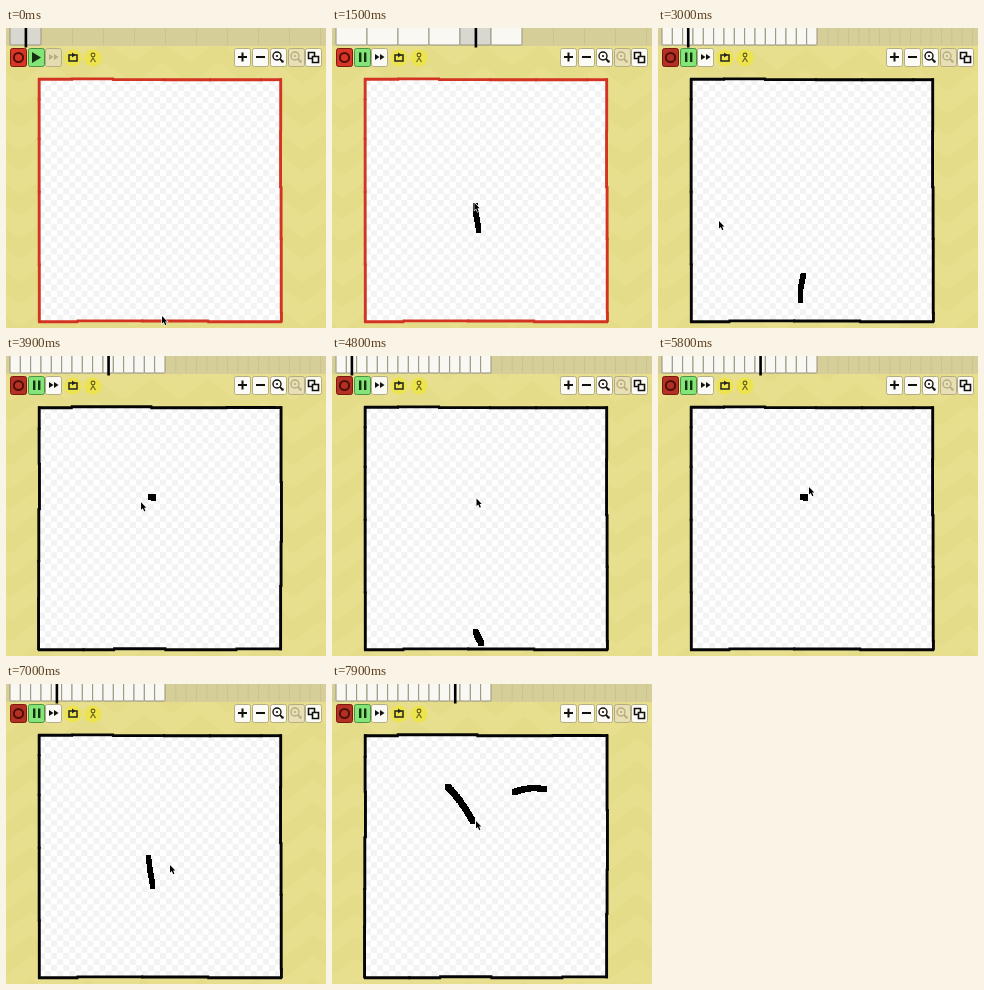
An HTML page with a canvas that plays this animation: 320x300 px, repeating every 8000 ms.

```html
<!DOCTYPE html>
<html lang="en">
<head>
<meta charset="utf-8">
<title>Sketch recorder</title>
<style>
html, body { margin: 0; width: 320px; height: 300px; overflow: hidden; background: #e6de8c; }
canvas { display: block; }
</style>
</head>
<body>
<canvas id="stage" width="320" height="300"></canvas>
<script>
const ctx = document.getElementById('stage').getContext('2d');
const LOOP = 8000, FRAMES = 15, FPS = 8.1, PLAY_AT = 898;
const PAPER = { x: 33, y: 51, size: 242 };
const INK = '#111', DIM = '#b6ad83', SUN = '#ede34c';

// Time is counted in animation steps since play was pressed.
const stepAt = t => Math.max(0, (t - PLAY_AT) * FPS / 1000);

// Pen strokes: a rocket rising, then two sparks thrown from its top.
const rocket = p => [
  145 + 4 * Math.cos(2.4 * (p - 1)) * Math.exp(-p / 12),
  141 + 156 / (1 + Math.exp(1.05 * (p - 3.65)))
];
const spark = (from, vx, vy, g) => p => {
  const u = p - from;
  return [142.5 + vx * u, 141.5 - vy * u + g * u * u];
};
const flights = [
  { from: 1, to: 10, at: rocket },
  { from: 26, to: 29, at: spark(26, -30, 56, 15) },
  { from: 40, to: 43, at: spark(40, 36.5, 46.5, 14.5) }
];

// Pointer rests between strokes: step, x, y
const rests = [
  [0, 156, 288], [15, 12, 32], [17, 61, 193],
  [31.6, 144.5, 142.5], [39.7, 151, 131], [49.4, 164, 181], [56.6, 144, 137]
];
const stops = [
  ...rests,
  ...flights.flatMap(f => [f.from, f.to].map(p => [p, ...f.at(p)]))
].sort((a, b) => a[0] - b[0]);

const flightAt = p => flights.find(f => p >= f.from && p < f.to);

function pointerAt(p) {
  const flight = flightAt(p);
  if (flight) return flight.at(p);
  const next = stops.findIndex(s => s[0] > p);
  if (next < 0) return stops.at(-1).slice(1);
  const [p0, x0, y0] = stops[next - 1], [p1, x1, y1] = stops[next];
  const u = (p - p0) / (p1 - p0), ease = u * u * (3 - 2 * u);
  return [x0 + (x1 - x0) * ease, y0 + (y1 - y0) * ease];
}

function random(seed) {
  return () => {
    seed = (seed * 16807) % 2147483647;
    return seed / 2147483647;
  };
}

function box(x, y, w, h, fill) {
  ctx.fillStyle = fill;
  ctx.fillRect(x, y, w, h);
}

function line(points, color, width) {
  ctx.strokeStyle = color;
  ctx.lineWidth = width;
  ctx.beginPath();
  points.forEach(p => ctx.lineTo(...p));
  ctx.stroke();
}

function shape(points, fill) {
  ctx.fillStyle = fill;
  ctx.beginPath();
  points.forEach(p => ctx.lineTo(...p));
  ctx.fill();
}

function disc(x, y, r, fill) {
  ctx.fillStyle = fill;
  ctx.beginPath();
  ctx.arc(x, y, r, 0, 7);
  ctx.fill();
}

function ring(x, y, r, color, width) {
  ctx.strokeStyle = color;
  ctx.lineWidth = width;
  ctx.beginPath();
  ctx.arc(x, y, r, 0, 7);
  ctx.stroke();
}

function plate(x, y, w, h, r, fill, edge, width = 1) {
  ctx.fillStyle = fill;
  ctx.strokeStyle = edge;
  ctx.lineWidth = width;
  ctx.beginPath();
  ctx.roundRect(x, y, w, h, r);
  ctx.fill();
  ctx.stroke();
}

function backdrop(t) {
  box(0, 0, 320, 300, '#e7df8e');
  const drift = t / 400;
  for (let y = -20; y < 320; y += 44) {
    const edge = [];
    for (let x = 0; x <= 320; x += 4) {
      edge.push([x, y + drift + 7 * Math.asin(Math.sin((x + drift) / 9))]);
    }
    const back = edge.map(([x, top]) => [x, top + 21]).reverse();
    shape([...edge, ...back], '#e4dc89');
  }
}

function timeline(step, recording, playing) {
  const idx = step % FRAMES, wide = recording && step < 9;
  const w = wide ? 31 : 31 / 3;
  const count = !playing ? 1 : recording ? Math.min(FRAMES, step + 2) : FRAMES;
  box(0, 0, 320, 18, '#d6ce98');
  for (let i = 0, x = 4; x < 320; i++, x += w) {
    const used = i < count;
    if (used) plate(x, -3, w, 20, 1, wide && i === idx ? '#d9d8d0' : '#f9f8f2', '#99947f');
    else box(x + w, 0, 1, 17, '#cbc38d');
  }
  box(4 + (idx + 0.5) * w - 0.9, 0, 2.6, 19.5, '#000');
}

const button = (x, fill, edge = '#b5ad84') => plate(x + 0.5, 20.5, 16, 18, 2, fill, edge);

function plus(x, y, r, color, width) {
  line([[x - r, y], [x + r, y]], color, width);
  line([[x, y - r], [x, y + r]], color, width);
}

function lens(x, color) {
  ring(x + 7, 28, 4, color, 1.4);
  disc(x + 7, 28, 1.1, color);
  line([[x + 10, 31], [x + 12, 33]], color, 1.8);
  disc(x + 12.5, 33.5, 1.3, color);
}

function toolbar(recording, playing) {
  button(4, recording ? '#d73526' : '#b23024', '#7c1a10');
  ring(12.5, 29.5, 4.6, '#4f0e08', 2);

  button(22, '#83e478', '#4d9146');
  if (playing) [27, 32].forEach(x => box(x, 24.5, 2.4, 9.5, '#15300f'));
  else shape([[26, 24], [35, 29.5], [26, 35]], '#15300f');

  button(39, playing ? '#fbfaf4' : '#e4dcae');
  [43, 48].forEach(x => shape([[x, 26], [x + 4.5, 29], [x, 32]], playing ? INK : DIM));

  disc(67, 30, 8.5, SUN);
  line([[66, 27], [63, 27], [63, 33], [71, 33], [71, 27], [68, 27]], '#222', 1.5);
  shape([[66, 24.5], [69.5, 27], [66, 29.5]], '#222');

  disc(87, 30, 8.5, SUN);
  ring(87, 27, 1.9, '#5d5720', 1.1);
  line([[84.5, 34], [87, 30], [89.5, 34]], '#5d5720', 1.1);

  [228, 246, 264, 299].forEach(x => button(x, '#fbfaf4'));
  button(282, '#e8e0b4');
  plus(236.5, 29, 4.5, INK, 2);
  line([[250, 29], [259, 29]], INK, 2);
  lens(264, INK);
  lens(282, DIM);
  [302.5, 306.5].forEach(x => plate(x, x - 278, 6, 6, 0, '#fbfaf4', INK, 1.6));
}

function paper() {
  const { x, y, size } = PAPER, cell = size / 40;
  box(x, y, size, size, '#fff');
  for (let r = 0; r < 40; r++) {
    for (let c = r % 2; c < 40; c += 2) box(x + c * cell, y + r * cell, cell, cell, '#f3f3f3');
  }
}

// Each side is a run of short, slightly misplaced marker strokes.
function border(color, seed) {
  const { x, y, size } = PAPER, rnd = random(seed);
  ctx.save();
  ctx.translate(x + size / 2, y + size / 2 + 0.3);
  for (let side = 0; side < 4; side++) {
    const half = size / 2;
    for (let a = -half; a < half;) {
      const b = Math.min(half, a + 30 + 50 * rnd());
      const shift = -half - 0.5 + rnd();
      line([[a - 1, shift], [b + 1, shift]], color, 2.9);
      a = b;
    }
    ctx.rotate(Math.PI / 2);
  }
  ctx.restore();
}

// A frame shows whatever the pen has drawn on it in any pass so far.
function drawing(p) {
  const { x, y, size } = PAPER, step = Math.floor(p);
  ctx.save();
  ctx.beginPath();
  ctx.rect(x, y, size, size);
  ctx.clip();
  for (let n = step % FRAMES; n <= step; n += FRAMES) {
    const flight = flightAt(n);
    if (!flight) continue;
    const end = Math.min(n + 0.92, p - 0.1);
    for (let q = n + 0.08; q <= end; q += 0.02) {
      const [px, py] = flight.at(q).map(Math.round);
      box(px - 2, py - 3, 5, 6, '#000');
    }
  }
  ctx.restore();
}

function pointer([x, y]) {
  const outline = [[0, 0], [0, 7.5], [1.8, 6], [3.2, 9.2], [4.4, 8.6], [3.1, 5.6], [5.3, 5.4], [0, 0]]
    .map(([dx, dy]) => [x + dx, y + dy]);
  line(outline, '#fff', 1.2);
  shape(outline, '#000');
}

function render(t) {
  const p = stepAt(t), step = Math.floor(p);
  const recording = p < FRAMES, playing = t >= PLAY_AT;
  backdrop(t);
  timeline(step, recording, playing);
  toolbar(recording, playing);
  paper();
  drawing(p);
  border(recording ? '#d23322' : '#050505', 7001 + 977 * ((step + recording) % 2));
  pointer(pointerAt(p));
}

const start = performance.now();
function tick() {
  const t = (performance.now() - start) % LOOP;
  render(Math.floor(t / 100) * 100);
  requestAnimationFrame(tick);
}
tick();
</script>
</body>
</html>
```
